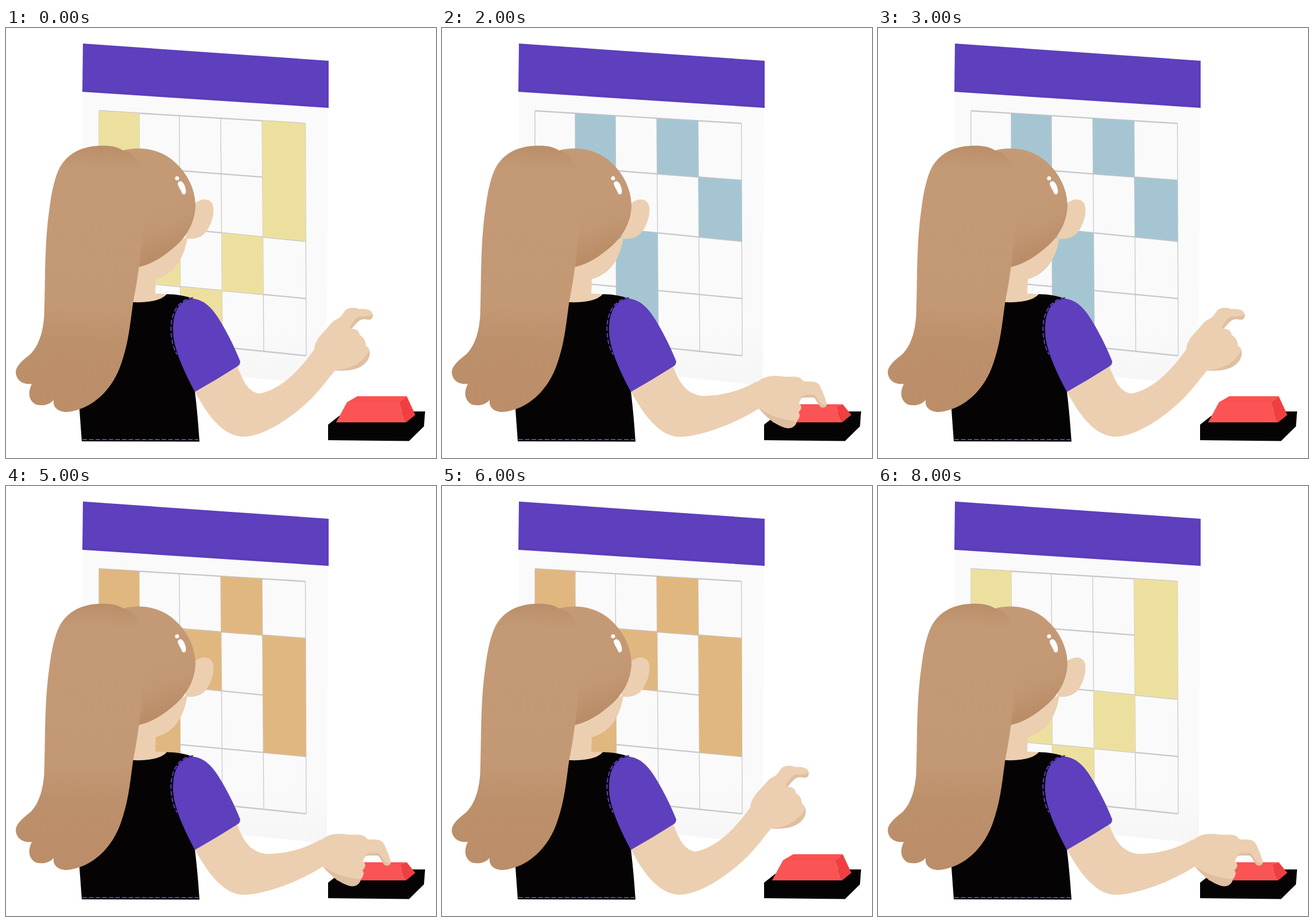
Write an HTML page that moves like this. It is 749 by 748 pixels and loops after 9000 ms.

```html
<!DOCTYPE html>
<html lang="en">
<head>
<meta charset="utf-8">
<title>Calendar button</title>
<style>
html, body { margin: 0; width: 100%; height: 100%; overflow: hidden; background: #fff; }
svg { display: block; width: 100%; height: 100%; }
.skin { fill: #ebcfb0; }
.shade { fill: #dfbfa1; }
.ink { fill: #050304; }
.violet { fill: #5e3fbd; }
.stitch { fill: none; stroke: #5e3fbd; stroke-width: 2; stroke-dasharray: 8 3.5; }
#lines { fill: none; stroke: #c8c8ca; }
</style>
</head>
<body>
<svg viewBox="0 0 749 748">
  <defs>
    <linearGradient id="paper" x2="0" y2="1">
      <stop offset=".8" stop-color="#fafafa"/><stop offset="1" stop-color="#f6f6f7"/>
    </linearGradient>
    <linearGradient id="tail" gradientUnits="userSpaceOnUse" x1="150" y1="205" x2="140" y2="668">
      <stop offset="0" stop-color="#ba8e69"/><stop offset=".09" stop-color="#c49a76"/>
      <stop offset=".6" stop-color="#c39874"/><stop offset=".74" stop-color="#bc906b"/>
      <stop offset="1" stop-color="#bb8e69"/>
    </linearGradient>
    <linearGradient id="cap" gradientUnits="userSpaceOnUse" x1="255" y1="300" x2="290" y2="395">
      <stop offset="0" stop-color="#c49a76"/><stop offset=".45" stop-color="#c29773"/>
      <stop offset="1" stop-color="#b98c67"/>
    </linearGradient>
  </defs>

  <!-- calendar -->
  <path fill="url(#paper)" d="M133 108L561 136L559 622L133 578Z"/>
  <path class="violet" d="M134 27L562 57V139L133 111Z"/>
  <path fill="none" stroke="#563ab0" d="M134 108L562 136"/>
  <g id="lines"></g>
  <path id="cells"/>

  <!-- button -->
  <path class="ink" d="M561 690L580 675L600 667H730L728 693L702 718.500L561 717Z"/>
  <g id="button"></g>

  <!-- arm -->
  <g id="raised">
    <path class="skin" d="M402 587C411 607 418 631 440 636C480 630 515 590 537 559C537 548 545 538 552 530C562 520 567 511 575 507C583 505 587 496 592 490C600 485 608 486 616 489C627 488 636 490 638 496C640 504 636 508 628 507C618 504 612 511 602 523C612 524 616 528 616 534C624 538 627 546 627 553C634 556 635 565 632 572C626 587 605 597 573 596C555 617 540 640 515 660C480 690 440 712 410 711C370 706 345 662 328 630Z"/>
    <path class="shade" d="M573 596C600 594 622 582 633 561C635 568 632 577 626 583C614 595 595 597 573 596ZM598 522C605 511 609 503 617 502C626 502 634 502 639 498C639 506 635 509 628 507C617 505 613 510 602 523Z"/>
  </g>
  <g id="lowered">
    <path class="skin" id="forearm"/>
    <g id="hand">
      <path class="skin" d="M524 630C538 623 547 617 556 611C566 605 580 604 592 606C604 608 614 605 621 608C628 609 625 614 633 615C646 614 655 616 658 622C664 634 668 645 670 653C671 660 664 662 660 659C655 653 653 647 649 643H627C624 648 622 650 622 654C629 657 625 666 621 668C625 674 622 680 618 684C617 692 610 697 600 696C580 690 563 675 552 662L530 674Z"/>
      <path class="shade" d="M552 661C570 674 590 681 617 684C616 693 609 697 600 696C580 691 563 676 552 661ZM625 644C627 639 632 638 639 638C648 637 651 639 654 645C657 651 661 656 669 657C666 661 662 661 659 659C654 653 652 647 648 643C640 642 632 642 625 644Z"/>
    </g>
  </g>

  <!-- head and body -->
  <path class="skin" d="M215 400L316 364C312 391 299 427 261 437L260 462L281 463L276 480H215Z"/>
  <path class="skin" d="M326 308C338 296 352 295 359 305C366 318 357 349 343 360C335 366 325 368 312 366Z"/>
  <path class="ink" d="M200 477H221C250 478 270 474 280 463C297 463 313 466 330 472L345 560L329 632C333 665 335 690 337 719.500L132 719L127 650Z"/>
  <path class="stitch" d="M133 716H335"/>
  <path class="violet" d="M329 633C312 601 299 573 293 546C286 508 296 473 325 471C345 472 360 488 372 508C388 534 400 560 408 580Q408 585 404 588Q368 611 329 633Z"/>
  <path class="stitch" d="M326 469C300 472 286 497 287.500 528C288.500 545 292 558 298 568"/>
  <path fill="url(#cap)" d="M204 213C225 207 258 207 285 226C315 248 330 280 330 310C329 340 313 366 290 384C270 401 250 412 230 416L200 400Z"/>
  <path fill="url(#tail)" d="M204 213C191 205 178 204 160 205C126 207 104 222 92 246C80 272 77 305 73 335C67 390 68.500 440 66.500 500C64.500 530 57 552 43 567C27 579 17 589 17 599C18 614 31 621 45 619C37 635 40 648 52 655C64 658 75 656 83 647C81 660 91 668 106 668C150 664 186 629 201 583C214 545 216 515 221.500 477C228 445 235 400 238 350C240 310 241 270 235 245C229 226 218 215 204 213Z"/>
  <circle fill="#fff" cx="298" cy="261.500" r="3.500"/>
  <path fill="#fff" d="M299 270C302 264 308 266 311 274C313 279 314 283 313 287C311 291 307 290 306 286C304 280 300 277 299 270Z"/>
</svg>
<script>
const $ = id => document.getElementById(id);
const mix = (a, b, t) => a + (b - a) * t;

// Perspective grid: column x along top and bottom, row y along left and right
const topX = [162, 232, 302, 374, 446, 521.5], bottomX = [162, 233, 304, 377, 449, 523];
const leftY = [144, 237.5, 335, 436.5, 533], rightY = [166, 265, 371, 470.5, 570];

function corner(c, r) {
  const x = mix(topX[c], bottomX[c], r / 4);
  return x + " " + mix(leftY[r], rightY[r], (x - 162) / 360);
}
const line = (a, b, width) => `<path stroke-width="${width}" d="M${corner(...a)}L${corner(...b)}"/>`;

$("lines").innerHTML =
  topX.map((_, c) => line([c, 0], [c, 4], 1.3)).join("") +
  leftY.map((_, r) => line([0, r], [5, r], 2.3)).join("");

// Each block is column, first row, last row
const plans = [
  { color: "#ede09f", blocks: ["000", "401", "322", "122", "233"] },
  { color: "#a6c5d2", blocks: ["100", "300", "411", "223"] },
  { color: "#e1b780", blocks: ["000", "300", "211", "412", "123"] }
];

function block([c, a, b]) {
  c = +c; a = +a; b = +b + 1;
  return `M${corner(c, a)}L${corner(c + 1, a)}L${corner(c + 1, b)}L${corner(c, b)}Z`;
}

function drawButton(pressed) {
  const top = pressed ? 654.5 : 640.5, edge = pressed ? 658 : 651;
  const side = pressed ? 686 : 684, left = pressed ? 590 : 594;
  $("button").innerHTML =
    `<path fill="#fb5050" d="M${left} ${edge}L612 ${top}H698L${side} ${edge}Z"/>` +
    `<path fill="#fb5455" d="M575 686L${left} ${edge}H${side}L697 686Z"/>` +
    `<path fill="#f03f40" d="M698 ${top}L713 673L697 686L${side} ${edge}Z"/>`;
}

function drawLowered(pressed) {
  const lift = pressed ? 0 : 5;
  $("forearm").setAttribute("d",
    `M402 587C412 615 425 638 455 640C490 ${640 - lift} 522 ${630 - lift} 548 ${615 - lift}` +
    "L562 655C520 685 450 712 412 711C375 710 345 662 328 630Z");
  $("hand").setAttribute("transform", pressed ? "" : "rotate(-6 535 675)");
}

let shown = -1;
function frame(now) {
  const step = Math.floor(now / 1000) % 9;
  if (step !== shown) {
    shown = step;
    const pose = step % 3; // raised, hovering, pressing
    const plan = plans[Math.floor((step + 1) / 3) % 3];
    $("cells").setAttribute("fill", plan.color);
    $("cells").setAttribute("d", plan.blocks.map(block).join(""));
    $("raised").style.display = pose ? "none" : "";
    $("lowered").style.display = pose ? "" : "none";
    drawLowered(pose === 2);
    drawButton(pose === 2);
  }
  requestAnimationFrame(frame);
}
frame(performance.now());
</script>
</body>
</html>
```
